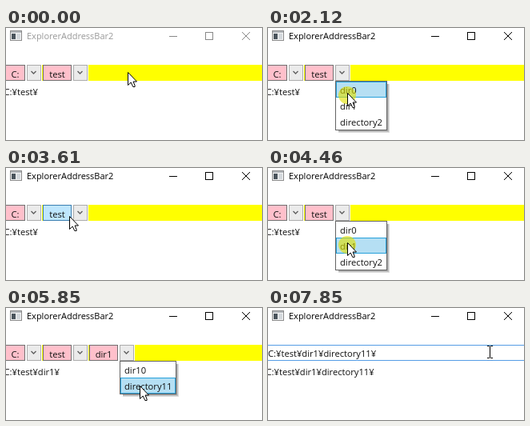
An HTML page with a canvas that plays this animation: 320 px wide and 140 px high, repeating every 8000 ms.

```html
<!DOCTYPE html>
<html lang="en">
<head>
<meta charset="utf-8">
<title>ExplorerAddressBar2</title>
<style>
  html, body { margin: 0; width: 100%; height: 100%; overflow: hidden; background: #fff; }
  canvas { display: block; width: 320px; height: 140px; }
</style>
</head>
<body>
<canvas width="320" height="140"></canvas>
<script>
const canvas = document.querySelector('canvas');
const ctx = canvas.getContext('2d');
const LOOP = 8000, TICK = 75;
const FONT = '"Open Sans", "Noto Sans", sans-serif';

// Pointer glides: start, end, destination x, destination y
const start = [152, 55];
const moves = [
  [320, 470, 103, 61], [640, 640, 99, 61], [1570, 1720, 99, 81],
  [2430, 2580, 138, 56], [2740, 2820, 83, 60], [3050, 3200, 79, 60],
  [3690, 3760, 88, 61], [3910, 3990, 95, 61], [4220, 4380, 99, 93],
  [4770, 4930, 150, 53], [5390, 5470, 160, 82], [5780, 5850, 167, 97],
  [6390, 6390, 168, 97], [6770, 7080, 275, 50]
];
const clicks = [
  [710, 940], [2120, 2350], [3370, 3610], [3990, 4140],
  [4460, 4690], [5010, 5170], [6080, 6240], [7160, 7470]
];
const popups = [
  { from: 860, to: 2350, x: 84, w: 65, items: ['dir0', 'dir1', 'directory2'] },
  { from: 4060, to: 4690, x: 84, w: 65, items: ['dir0', 'dir1', 'directory2'] },
  { from: 5090, to: 6160, x: 142, w: 71, items: ['dir10', 'directory11'] }
];
const paths = [
  [0, ['C:', 'test']], [2350, ['C:', 'test', 'dir0']], [3530, ['C:', 'test']],
  [4690, ['C:', 'test', 'dir1']], [6160, ['C:', 'test', 'dir1', 'directory11']]
];
const crumbX = [-1, 46, 104, 162];
const crumbW = [25, 36, 36, 72];
const leaves = ['dir0', 'directory11'];
const ACTIVE_AT = 710, EDIT_AT = 7240, BEAM_AT = 7310, CARET_OFF = 7850;

const during = (t, [from, to]) => t >= from && t < to;

function pointerAt(t) {
  let [x, y] = start;
  for (const [from, to, toX, toY] of moves) {
    if (t < from) break;
    const steps = Math.round((to - from) / TICK);
    const done = t >= to ? 1 : (Math.floor((t - from) / (to - from) * steps) + 1) / (steps + 1);
    x += (toX - x) * done;
    y += (toY - y) * done;
  }
  return { x: Math.round(x), y: Math.round(y) };
}

function fill(x, y, w, h, color) {
  ctx.fillStyle = color;
  ctx.fillRect(x, y, w, h);
}

function box(x, y, w, h, color, border) {
  fill(x, y, w, h, border);
  fill(x + 1, y + 1, w - 2, h - 2, color);
}

function line(points, color, width = 1) {
  ctx.beginPath();
  points.forEach(([x, y]) => ctx.lineTo(x, y));
  ctx.strokeStyle = color;
  ctx.lineWidth = width;
  ctx.stroke();
}

function text(value, x, y, color = '#111', size = 11.2, align = 'left') {
  ctx.font = `${size}px ${FONT}`;
  ctx.textAlign = align;
  ctx.fillStyle = color;
  ctx.fillText(value, x, y);
}

function titleBar(active) {
  box(5, 3, 15, 13, '#f4f4f4', '#8a8a8a');
  fill(6, 4, 13, 2, '#b4b8bc');
  fill(7, 7, 5, 7, '#4a545c');
  fill(13, 7, 5, 7, '#d4d8dc');
  text('ExplorerAddressBar2', 26, 14, active ? '#000' : '#999', 11);
  const ink = active ? '#000' : '#888';
  fill(204, 10, 10, 1, ink);
  ctx.strokeStyle = ink;
  ctx.lineWidth = 1;
  ctx.strokeRect(249.5, 5.5, 9, 9);
  line([[295, 5], [305, 15]], ink);
  line([[305, 5], [295, 15]], ink);
}

function chevron(x, hover) {
  box(x, 46, 18, 20, hover ? '#e2effc' : '#ebebeb', hover ? '#7eb4ea' : '#acacac');
  line([[x + 5.5, 54], [x + 8.5, 57], [x + 11.5, 54]], hover ? '#000' : '#606060', 1.4);
}

function crumbs(path, pointer) {
  const over = (x, w) => pointer.y >= 46 && pointer.y < 66 && pointer.x >= x && pointer.x < x + w;
  fill(0, 46, 320, 20, '#ff0');
  path.forEach((name, i) => {
    const x = crumbX[i], w = crumbW[i], hover = over(x, w);
    const leaf = leaves.includes(name);
    fill(x, 46, leaf ? w : w + 21, 20, '#fff');
    box(x, 46, w, 20, hover ? '#bee6fd' : '#ffc0cb', hover ? '#3c7fb1' : '#707070');
    text(name, x + w / 2, 62, '#111', 11.2, 'center');
    if (!leaf) chevron(x + w + 2, over(x + w + 2, 18));
  });
}

function editor(path, caret) {
  box(-1, 46, 322, 20, '#fff', '#569de5');
  text(path, 0, 61);
  if (caret) fill(136, 48, 1, 16, '#000');
}

function popup({ x, w, items }, pointer) {
  const h = items.length * 20 + 2;
  for (let i = 4; i > 0; i--) fill(x + 4, 70, w - 4 + i - 1, h - 5 + i, 'rgba(0,0,0,.13)');
  box(x, 66, w, h, '#fff', '#646464');
  const selected = Math.floor((pointer.y - 67) / 20);
  items.forEach((name, i) => {
    const y = 67 + i * 20;
    if (i === selected) box(x + 1, y, w - 2, 20, '#b5dff3', '#26a0da');
    text(name, x + 6, y + 15);
  });
}

function clickSpot({ x, y }) {
  ctx.beginPath();
  ctx.arc(x, y + 3, 11, 0, Math.PI * 2);
  ctx.fillStyle = 'rgba(225,225,0,.62)';
  ctx.fill();
}

function arrow({ x, y }) {
  ctx.save();
  ctx.translate(x + .5, y + .5);
  const shape = new Path2D('M0 0V16L3.7 12.5L6.3 18H8.6V16.5L6.6 11.5H11Z');
  ctx.fillStyle = '#fff';
  ctx.fill(shape);
  ctx.strokeStyle = '#000';
  ctx.lineWidth = 1;
  ctx.stroke(shape);
  ctx.restore();
}

function beam({ x, y }) {
  const cx = x + 2, top = y - 3;
  fill(cx, top + 1, 1, 14, '#000');
  for (const row of [top, top + 15]) {
    fill(cx - 3, row, 3, 1, '#000');
    fill(cx + 1, row, 3, 1, '#000');
  }
}

function draw(t) {
  const pointer = pointerAt(t);
  const path = paths.findLast(([from]) => t >= from)[1];
  const pathText = path.map(name => name + '¥').join('');
  fill(0, 0, 320, 140, '#fff');
  titleBar(t >= ACTIVE_AT);
  if (t >= EDIT_AT) editor(pathText, t >= BEAM_AT && t < CARET_OFF);
  else crumbs(path, pointer);
  text(pathText, -2.5, 84);
  const open = popups.find(p => during(t, [p.from, p.to]));
  if (open) popup(open, pointer);
  if (clicks.some(span => during(t, span))) clickSpot(pointer);
  (t >= BEAM_AT ? beam : arrow)(pointer);
}

const began = performance.now();
function frame() {
  draw((performance.now() - began) % LOOP);
  requestAnimationFrame(frame);
}
frame();
</script>
</body>
</html>
```
